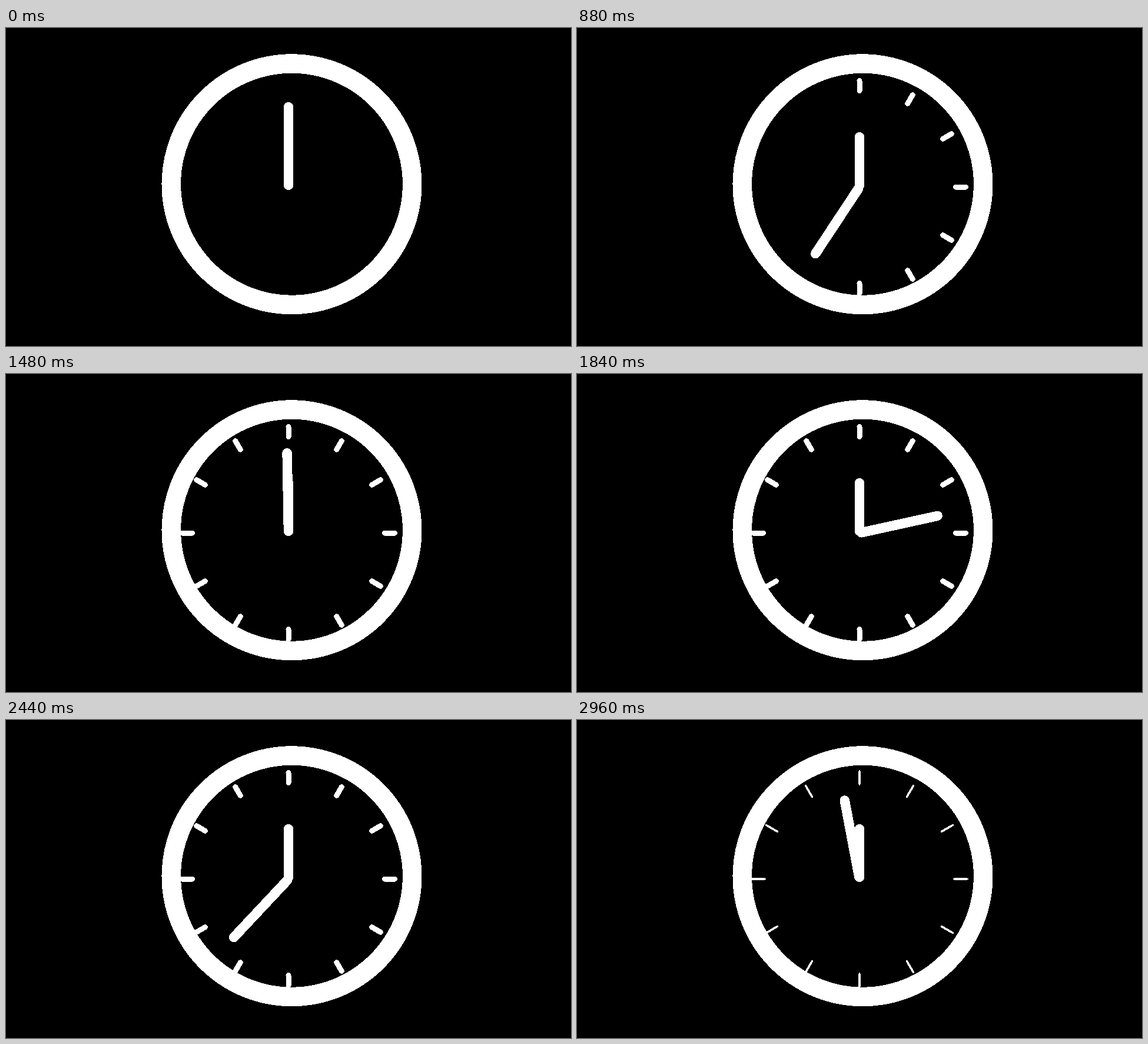
An HTML page for the animation above (3000 ms loop, 960 by 540 pixels).

```html
<!DOCTYPE html>
<html lang="en">
<head>
<meta charset="utf-8">
<title>Clock</title>
<style>
  html, body { margin: 0; width: 100%; height: 100%; overflow: hidden; background: #000; }
  svg { display: block; }
</style>
</head>
<body>
<svg width="960" height="540" fill="#fff" shape-rendering="crispEdges">
  <circle cx="485.5" cy="265.25" r="204.75" fill="none" stroke="#fff" stroke-width="32.5"/>
  <g id="dial" transform="translate(480 270)"></g>
</svg>
<script>
const STEP = 40, STEPS = 75, TURN = 38;
const dial = document.getElementById('dial');

// Rounded bar pointing up from the pivot, between two radii
function bar(inner, outer, width) {
  const rect = document.createElementNS('http://www.w3.org/2000/svg', 'rect');
  const box = { x: -width / 2, y: -outer, width, height: outer - inner, rx: width / 2 };
  for (const name in box) rect.setAttribute(name, box[name]);
  return dial.appendChild(rect);
}

function pose(rect, angle, squeeze = 1) {
  rect.setAttribute('transform', `rotate(${angle}) scale(${squeeze} 1)`);
}

const ticks = Array.from({ length: 12 }, () => bar(159, 185, 9));
const hourHand = bar(-5, 93, 16.5);
const minuteHand = bar(-5, 144, 16.5);

function draw(step) {
  // Ticks pop in one by one and thin out at the end
  const squeeze = 1 - 0.15 * Math.max(0, step - 70);
  ticks.forEach((rect, k) => {
    rect.setAttribute('visibility', step >= 3 * k + 2 ? 'visible' : 'hidden');
    pose(rect, 30 * k, squeeze);
  });
  pose(minuteHand, (step % TURN) * 359 / (TURN - 1));
}

function tick(now) {
  draw(Math.floor(now / STEP) % STEPS);
  requestAnimationFrame(tick);
}

draw(0);
requestAnimationFrame(tick);
</script>
</body>
</html>
```
